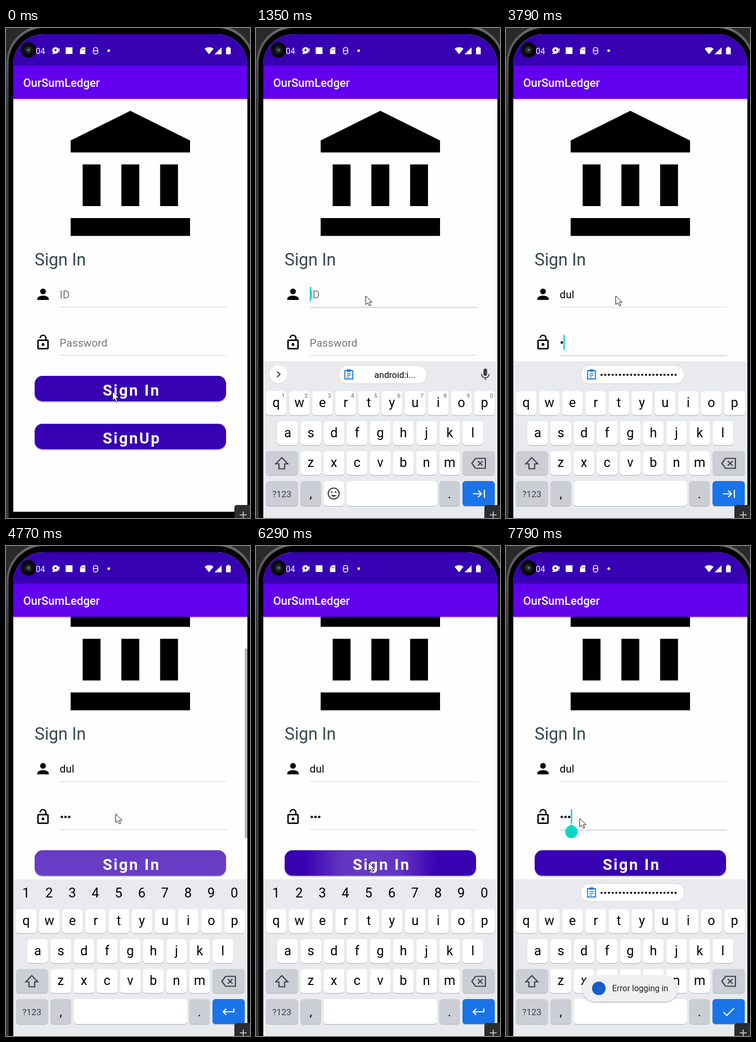
Write an HTML page that moves like this. It is 468 px wide and 941 px high and loops after 8 s.

```html
<!DOCTYPE html>
<html lang="en">
<head>
<meta charset="utf-8">
<title>Sign in</title>
<style>
html, body { margin: 0; height: 100%; overflow: hidden; background: #000; }
svg { display: block; width: 468px; height: 941px; font-family: Roboto, sans-serif; }
.field { font-size: 20.3px; letter-spacing: .25px; }
.hint { fill: #757575; }
.btn { font: bold 29.5px Roboto, sans-serif; letter-spacing: 2.7px; fill: #fff; }
.line { fill: none; stroke: #3c4043; stroke-width: 2.2; }
.mid { text-anchor: middle; }
</style>
</head>
<body>
<svg id="stage" viewBox="0 0 468 941"></svg>
<script>
const rect = (x, y, w, h, fill, r = 0, extra = '') =>
  `<rect x="${x}" y="${y}" width="${w}" height="${h}" rx="${r}" fill="${fill}" ${extra}/>`;
const circle = (x, y, r, fill, extra = '') => `<circle cx="${x}" cy="${y}" r="${r}" fill="${fill}" ${extra}/>`;
const path = (d, extra = '') => `<path d="${d}" ${extra}/>`;
const text = (s, x, y, size, fill = '#000', extra = '') =>
  `<text x="${x}" y="${y}" font-size="${size}" fill="${fill}" ${extra}>${s}</text>`;
const label = (s, x, y, size, fill) => text(s, x, y, size, fill, 'class="mid"');
const group = (id, body, extra = '') => `<g id="${id}" ${extra}>${body}</g>`;

const PITCH = 44.4, GREY = '#cbced5', BLUE = '#1a73e8', TEAL = '#03d8c5';
const key = (x, y, w = 39.5, fill = '#fff', h = 46) =>
  rect(x, y + 1.2, w, h, '#b4b7bb', 6) + rect(x, y, w, h, fill, 6);
const keyRow = (letters, x, y) => [...letters].map((c, i) =>
  key(x + i * PITCH, y) + label(c, x + 19.7 + i * PITCH, y + 30.5, 25)).join('');
const digits = (x, y, size, fill) => [...'1234567890'].map((c, i) =>
  label(c, x + i * PITCH, y, size, fill)).join('');
const clipboard = x =>
  path(`M${x - 7.5} 658h15v16h-15z`, `fill="none" stroke="${BLUE}" stroke-width="2"`) +
  rect(x - 4, 655.5, 8, 4.5, BLUE, 1.5) +
  path(`M${x - 4} 663.5h8m-8 3.5h8m-8 3.5h5`, `stroke="${BLUE}" stroke-width="1.6"`);
const chip = (x, w) => rect(x, 648, w, 35, '#fff', 17.5, 'stroke="#cfd1d5"');

const keyboard = rect(14, 640, 449, 301, '#e8eaed') +
  keyRow('qwertyuiop', 19, 697.5) + keyRow('asdfghjkl', 41, 755) + keyRow('zxcvbnm', 85.3, 812.5) +
  key(19, 812.5, 61.5, GREY) + path('M49.5 825l-11.5 12h6v9.5h11v-9.5h6z', 'class="line"') +
  key(396, 812.5, 62, GREY) +
  path('M414 836l7-9.500h19v19h-19zM425.500 831.500l9 9m0-9l-9 9', 'class="line"') +
  key(19, 870, 61.5, GREY, 48) + label('?123', 49.5, 900.5, 17, '#3c4043') +
  key(85.3, 870, 39.5, GREY, 48) + label(',', 105, 903, 24) +
  key(351.5, 870, 39.5, GREY, 48) + label('.', 371, 903, 24) +
  key(396, 870, 62, BLUE, 48) +
  group('wideSpace', key(129.5, 870, 217.5, '#fff', 48)) +
  group('idKeys',
    key(129.5, 870, 39.5, '#fff', 48) + key(174, 870, 173, '#fff', 48) +
    circle(149, 894, 10.5, 'none', 'class="line"') +
    circle(145.3, 891, 1.7, '#3c4043') + circle(152.7, 891, 1.7, '#3c4043') +
    path('M143.500 897a6 5 0 0 0 11 0z', 'fill="#3c4043"') +
    digits(52, 710, 11, '#5f6368') +
    circle(43, 666, 18, '#d5d7da') + circle(43, 665, 17.5, '#fff') +
    path('M40.500 659.500l5.500 5.500l-5.500 5.500', 'class="line"') +
    rect(436.300, 654, 7, 14, '#3c4043', 3.5) +
    path('M432.500 664.500a7.300 7.300 0 0 0 14.600 0M439.800 672v4', 'class="line" style="stroke-width:2"')) +
  group('idChip', chip(158, 170) + clipboard(178) + text('android:i...', 227, 672, 17)) +
  group('passChip', chip(143, 199) + clipboard(164) +
    Array.from({ length: 21 }, (_, i) => circle(183.3 + i * 7.1, 666, 2.1, '#000')).join('')) +
  group('numbers', digits(38.3, 675, 25.5)) +
  `<g fill="none" stroke="#fff" stroke-width="2.2">` +
  path('M416 894.500h17m-7-6.500l6.500 6.500l-6.500 6.500M438 887v15', 'id="tabIcon"') +
  path('M437 888v6.500h-20.500m6-6l-6 6l6 6', 'id="enterIcon"') +
  path('M417 895l6.500 6.500l14-14', 'id="checkIcon"') + '</g>';

const button = (s, y, glow = '') =>
  rect(55, y, 367, 49, '#3700b3', 15, 'filter="url(#shadow)"') + glow + text(s, 185.4, y + 38, 29.5, '#fff', 'class="btn"');

const page =
  path('M238.500 159L353 216V239H124V216zM147 262h34.300v80H147zM221.300 262h34.300v80h-34.300zM295.600 262h34.300v80h-34.300zM124 365h229v34.300H124z') +
  text('Sign In', 54.8, 456, 32.6, '#37474f') +
  path('M12 12c2.210 0 4-1.790 4-4s-1.790-4-4-4-4 1.790-4 4 1.790 4 4 4zm0 2c-2.670 0-8 1.340-8 4v2h16v-2c0-2.660-5.330-4-8-4z',
    'transform="translate(54.600 495) scale(1.366)"') +
  path('M12 17a2 2 0 1 0 0-4a2 2 0 0 0 0 4zM18 8h-1V6a5 5 0 0 0-10 0h1.900a3.100 3.100 0 0 1 6.200 0v2H6a2 2 0 0 0-2 2v10a2 2 0 0 0 2 2h12a2 2 0 0 0 2-2V10a2 2 0 0 0-2-2zm0 12H6V10h12z',
    'transform="translate(54.600 587.300) scale(1.366)" fill-rule="evenodd"') +
  '<text id="idText" class="field" x="103" y="519"></text><text id="passText" class="field hint" x="103" y="612">Password</text>' +
  [0, 1, 2].map(i => circle(107 + i * 7.1, 604, 2.4, '#000', `id="dot${i}"`)).join('') +
  rect(103, 535.5, 321, 1.2, '#dadada', 0, 'id="idLine"') +
  rect(103, 628, 321, 1.2, '#dadada', 0, 'id="passLine"') +
  rect(0, 0, 2.6, 28, TEAL, 0, 'id="caret"') +
  button('Sign In', 668, rect(55, 668, 367, 49, '#fff', 15, 'id="focusGlow"') + rect(55, 668, 367, 49, 'url(#ripple)', 15, 'id="ripplePaint"')) +
  button('SignUp', 760) +
  path('M0-14.500L8.500-8.500A12 12 0 1 1-8.500-8.500z', `id="handle" fill="${TEAL}"`);

const statusIcons =
  text('04', 57, 50, 16, '#fff') +
  circle(43, 42, 15, '#050505') + circle(43, 42, 9, '#121314') + circle(43, 42, 5.5, '#2b3236') + circle(43.5, 42, 1.8, '#7f8b90') +
  circle(95, 43, 6.3, '#fff') + circle(95, 42.5, 2, '#3700b3') + path('M89 48h4v2h-4zM101.500 39h1.500v5h-1.500zM101.500 45.500h1.500v1.500h-1.500z', 'fill="#fff"') +
  rect(114.5, 37, 13, 13, '#fff') +
  path('M146 36.500h6.500v14h-11v-9.500zM145 40v3m2.500-3v3m2.500-3v3', 'fill="#fff" stroke="#3700b3" stroke-width=".8"') +
  rect(167.5, 37.5, 8.5, 12.5, 'none', 4, 'stroke="#fff" stroke-width="1.6"') + path('M167 43.500h9.500', 'stroke="#fff" stroke-width="1.5"') +
  circle(197, 43.5, 2.5, '#fff') +
  path('M389.500 50.500L381 40a13 13 0 0 1 17 0zM400 50.500L413.500 37v13.500zM422 38h2.500v-2h4v2h2.500v12.500h-9z', 'fill="#fff"');

stage.innerHTML = `<defs>
  <clipPath id="screen"><rect x="14" y="12" width="449" height="990" rx="58"/></clipPath>
  <clipPath id="body"><rect x="14" y="136" width="449" height="793"/></clipPath>
  <filter id="shadow" x="-5%" y="-20%" width="110%" height="150%"><feDropShadow dx="0" dy="2" stdDeviation="1.3" flood-opacity=".25"/></filter>
  <radialGradient id="ripple" gradientUnits="userSpaceOnUse" cx="219" cy="693" r="130">
    <stop offset="0" stop-color="#fff"/><stop offset=".45" stop-color="#fff" stop-opacity=".85"/><stop offset="1" stop-color="#fff" stop-opacity="0"/>
  </radialGradient>
  <linearGradient id="barShade" x2="0" y2="1"><stop stop-opacity=".2"/><stop offset="1" stop-opacity="0"/></linearGradient>
  <linearGradient id="rim" x2="0" y2="1"><stop stop-color="#6a6a6a"/><stop offset=".15" stop-color="#3a3a3a"/></linearGradient>
</defs>` +
  rect(0, 0, 468, 941, '#2a2a2a') + rect(1, -5, 475, 1100, 'url(#rim)', 72) + rect(5, 0, 467, 1100, '#000', 68) +
  `<g clip-path="url(#screen)">` +
  rect(14, 12, 449, 917, '#fefefe') +
  `<g clip-path="url(#body)">${group('page', page)}${rect(458, 197, 5, 364, '#b1b1b1', 0, 'id="scrollbar"')}</g>` +
  rect(14, 136, 449, 4, 'url(#barShade)') + rect(14, 12, 449, 60, '#3700b3') + rect(14, 72, 449, 64, '#6200ee') +
  text('OurSumLedger', 33, 113, 21.85, '#fff', 'font-weight="500"') +
  group('keyboard', keyboard) +
  group('toast', rect(146, 824, 184, 51, '#eff0f2', 25.5, 'filter="url(#shadow)"') + circle(178, 849.5, 13, '#1a5cc8') +
    text('Error logging in', 203.5, 855, 16, '#222')) +
  '</g>' + statusIcons +
  rect(438, 916, 40, 40, '#2c2d2f', 5) + path('M448.500 935h13m-6.500-6.500v13', 'stroke="#bbb" stroke-width="2"') +
  path('M0 0V16.500L4 13L6.800 19.200L9.500 18L6.800 12H12z', 'id="pointer" fill="#fff" stroke="#111" stroke-width="1"');

const $ = id => document.getElementById(id);
const show = (id, on) => $(id).setAttribute('opacity', +on);
const move = (id, x, y) => $(id).setAttribute('transform', `translate(${x} ${y})`);
const between = (t, a, b) => t >= a && t < b;
// progress in n held steps: the first at a, the last (1) at b
const steps = (t, a, b, n) =>
  t < a ? 0 : t >= b ? 1 : (Math.floor((t - a) / (b - a) * (n - 1)) + 1) / n;
const mix = (a, b, p) => a + (b - a) * p;

function pointerAt(t) {
  if (t < 1080) {
    const p = steps(t, 120, 960, 7);
    return p < .4 ? [mix(204.5, 208, p / .4), mix(698.5, 780, p / .4)]
      : [mix(208, 210.5, (p - .4) / .6), mix(780, 514.5, (p - .4) / .6)];
  }
  const down = steps(t, 5570, 5980, 4), back = steps(t, 6800, 7230, 4);
  return [mix(mix(210.5, 215.5, down), 141.5, back), mix(mix(514.5, 607.5, down), 523, back)];
}

function draw(t) {
  const idFocus = between(t, 1080, 2520), again = t >= 7370;
  const passFocus = between(t, 2520, 4400) || again;
  const typed = 'dul'.slice(0, t < 2000 ? 0 : t < 2150 ? 1 : t < 2370 ? 2 : 3);
  const dots = (t >= 3790) + (t >= 3940) + (t >= 4250);

  move('page', 0, -83.7 * steps(t, 4400, 4770, 3));
  $('idText').textContent = typed || 'ID';
  $('idText').classList.toggle('hint', !typed);
  show('passText', !dots);
  for (let i = 0; i < 3; i++) show('dot' + i, i < dots);
  $('idLine').setAttribute('height', idFocus ? 2.4 : 1.2);
  $('passLine').setAttribute('height', passFocus ? 2.4 : 1.2);

  const caretX = idFocus ? 103.3 + (typed ? $('idText').getComputedTextLength() : 0) : 103 + 7.1 * dots;
  move('caret', caretX, idFocus ? 497 : 589.5);
  show('caret', (idFocus || passFocus) && !between(t, 1600, 2000) && !between(t, 2950, 3230));
  move('handle', t < 7790 ? 105 : 125.5, 632.7);
  show('handle', t >= 7640);

  show('focusGlow', t >= 4400 && t < 6110 ? .24 : 0);
  show('ripplePaint', between(t, 6110, 6530) ? (t < 6410 ? .24 : .1) : 0);
  show('scrollbar', between(t, 4400, 5700) ? (t < 5570 ? 1 : .5) : 0);

  const idMode = t < 2520, tail = t >= 4400 && !again;
  show('keyboard', t >= 1200);
  move('keyboard', 0, t < 1350 ? 150 : 0);
  show('idKeys', idMode);
  show('wideSpace', !idMode);
  show('idChip', t < 2000);
  show('passChip', passFocus);
  show('numbers', tail);
  show('tabIcon', t < 4400);
  show('enterIcon', tail);
  show('checkIcon', again);

  const rise = steps(t, 6680, 6950, 3);
  show('toast', rise);
  move('toast', 0, 18 * (1 - rise));
  move('pointer', ...pointerAt(t));
}

const start = performance.now();
(function tick() {
  draw((performance.now() - start) % 8000);
  requestAnimationFrame(tick);
})();
</script>
</body>
</html>
```
